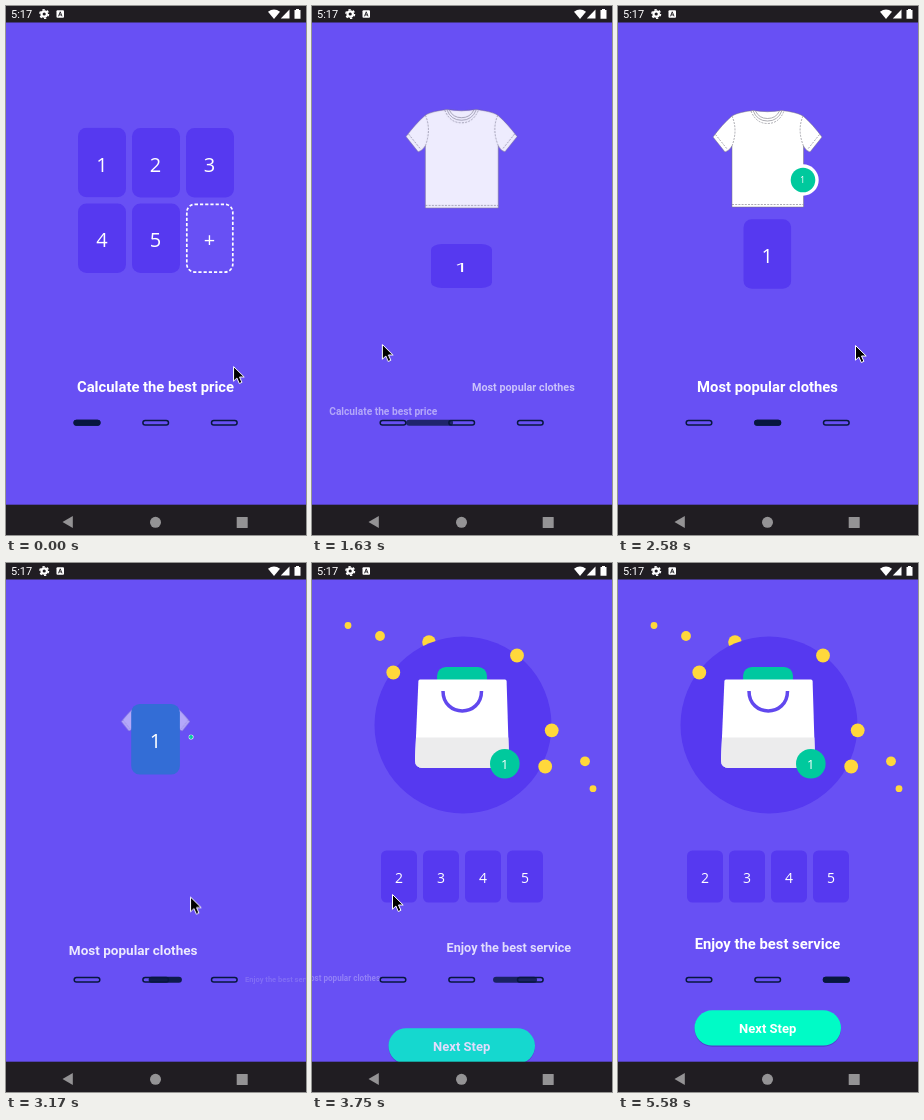
Animation, 300 px wide and 529 px high, one loop 5.62 s. Source, as an HTML page:

```html
<!DOCTYPE html>
<html lang="en">
<head>
<meta charset="utf-8">
<title>Onboarding</title>
<style>
  html, body { margin: 0; width: 100%; height: 100%; overflow: hidden; background: #6850f4; }
  svg { display: block; width: 300px; height: 529px; }
  text { fill: #fff; text-anchor: middle; font-family: "Open Sans", "Noto Sans", sans-serif; }
  .title { font: 700 14.8px Roboto, sans-serif; }
  .num { font-size: 20px; }
  .small { font-size: 14px; }
  .card { fill: #5639f0; }
  .slot { fill: none; stroke: #07173f; stroke-width: 1.5; }
  .stitch { fill: none; stroke: #8a8a92; stroke-width: .7; stroke-dasharray: 2 1.2; }
  .seam { fill: none; stroke: #8a8a92; stroke-width: .7; }

  .anim { animation: 5620ms linear infinite both; }
  .grid { transform-origin: 149.5px 194px; animation-name: grid; }
  .title1 { animation-name: title1; }
  .title2 { animation-name: title2; }
  .title3 { animation-name: title3; }
  .pill { fill: #07173f; animation-name: pill; }
  .shirt { transform-origin: 149.5px 152px; animation-name: shirt; }
  .tag { transform-origin: 185px 174px; animation-name: tag; }
  .first { animation-name: first; }
  .first rect { animation-name: tint; }
  .halo { transform-origin: 151px 162px; animation-name: halo; }
  .bag { transform-origin: 150px 205px; animation-name: bag; }
  .detail { animation-name: detail; }
  .count { transform-origin: 193px 201px; animation-name: count; }
  .rest { transform-origin: 150px 313px; animation-name: rest; }
  .button { animation-name: button; }
  .cursor { animation-name: cursor; }

  @keyframes grid {
    0%, 21.7% { transform: none; opacity: 1; }
    27.5%, 100% { transform: scale(.6); opacity: 0; }
  }
  @keyframes title1 {
    0%, 21.7% { transform: translate(0, 0) scale(1); opacity: 1; }
    29% { transform: translate(-78px, 24px) scale(.69); opacity: .5; }
    36.5%, 100% { transform: translate(-150px, 44px) scale(.4); opacity: 0; }
  }
  @keyframes title2 {
    0%, 21.7% { transform: translate(132px, 10px) scale(.42); opacity: 0; }
    29% { transform: translate(62px, .5px) scale(.73); opacity: .65; }
    36.5%, 53.4% { transform: translate(0, 0) scale(1); opacity: 1; }
    60.85% { transform: translate(-55px, 16px) scale(.79); opacity: .7; }
    66.73% { transform: translate(-120px, 34px) scale(.55); opacity: .28; }
    72.6%, 100% { transform: translate(-155px, 44px) scale(.4); opacity: 0; }
  }
  @keyframes title3 {
    0%, 53.4% { transform: translate(140px, 44px) scale(.42); opacity: 0; }
    60.85% { transform: translate(107px, 23.5px) scale(.64); opacity: .4; }
    66.73% { transform: translate(47.5px, 4px) scale(.856); opacity: .8; }
    72.6%, 100% { transform: translate(0, 0) scale(1); opacity: 1; }
  }
  @keyframes pill {
    0%, 21.7% { x: 67.5px; width: 27px; opacity: 1; }
    29% { x: 94px; width: 47px; opacity: .75; }
    36.5%, 53.4% { x: 136.2px; width: 27px; opacity: 1; }
    60.85% { x: 152px; width: 42.5px; opacity: .8; }
    66.73% { x: 181px; width: 44px; opacity: .8; }
    72.6%, 100% { x: 204.8px; width: 27px; opacity: 1; }
  }
  @keyframes shirt {
    0%, 23% { transform: translateY(0) scale(1.08); opacity: 0; }
    29% { transform: translateY(0) scale(1.02); opacity: .89; }
    33%, 53.4% { transform: translateY(0) scale(1); opacity: 1; }
    59.5%, 100% { transform: translateY(40px) scale(.25); opacity: 0; }
  }
  @keyframes tag {
    0%, 31% { transform: scale(0); }
    36.5%, 53.4% { transform: scale(1); }
    57%, 100% { transform: scale(0); }
  }
  @keyframes first {
    0%, 21.7% { transform: translate(96px, 156.5px) scale(1); }
    29% { transform: translate(149.5px, 260px) scale(1.27, .63); }
    36.5%, 53.4% { transform: translate(149.3px, 248px) scale(1); }
    60.85% { transform: translate(149.8px, 71px) scale(1.04); }
    66%, 100% { transform: translate(150px, 140px) scale(1.04); }
  }
  @keyframes tint {
    0%, 53.4% { fill: #5639f0; }
    60.85% { fill: #00b8b0; }
    66%, 100% { fill: #00c8a0; }
  }
  @keyframes halo {
    0%, 61% { transform: scale(0); animation-timing-function: ease-out; }
    65.8%, 100% { transform: scale(1); }
  }
  @keyframes bag {
    0%, 57% { transform: scale(0); }
    60.85% { transform: scale(.35); }
    65%, 100% { transform: scale(1); }
  }
  @keyframes detail {
    0%, 61% { opacity: 0; }
    65%, 100% { opacity: 1; }
  }
  @keyframes count {
    0%, 62.5% { transform: scale(0); }
    66.3%, 100% { transform: scale(1); }
  }
  @keyframes rest {
    0%, 61.2% { transform: scale(.6); opacity: 0; }
    66%, 100% { transform: scale(1); opacity: 1; }
  }
  @keyframes button {
    0%, 53.4% { transform: translateY(80px); opacity: 0; }
    60.85% { transform: translateY(47px); opacity: .5; }
    66.73% { transform: translateY(18px); opacity: .8; }
    72.6%, 100% { transform: translateY(0); opacity: 1; }
  }
  @keyframes cursor {
    0% { transform: translate(227px, 360px); }
    9%, 12.5% { transform: translate(238px, 367px); }
    18% { transform: translate(245px, 358px); }
    21% { transform: translate(240px, 350px); }
    29% { transform: translate(70px, 338px); }
    32% { transform: translate(50px, 337px); }
    35% { transform: translate(55px, 337px); }
    43% { transform: translate(224px, 338px); }
    45.9%, 51.6% { transform: translate(237px, 339px); }
    54% { transform: translate(230px, 336px); }
    60.85% { transform: translate(100px, 329px); }
    63.2% { transform: translate(80px, 331px); }
    74.9% { transform: translate(80px, 331px); opacity: 1; }
    74.91%, 100% { transform: translate(80px, 331px); opacity: 0; }
  }
</style>
</head>
<body>
<svg viewBox="0 0 300 529">
  <rect width="300" height="529" fill="#6850f4"/>

  <g class="anim grid">
    <g class="card">
      <rect x="126" y="122" width="48" height="69.5" rx="8.5"/>
      <rect x="180" y="122" width="48" height="69.5" rx="8.5"/>
      <rect x="72" y="197.5" width="48" height="69.5" rx="8.5"/>
      <rect x="126" y="197.5" width="48" height="69.5" rx="8.5"/>
    </g>
    <rect x="180.8" y="198.3" width="46" height="67.8" rx="8" fill="none" stroke="#fff" stroke-width="1.7" stroke-dasharray="3.2 2"/>
    <g class="num">
      <text x="149.5" y="165.5">2</text>
      <text x="203.5" y="165.5">3</text>
      <text x="96" y="241">4</text>
      <text x="149.5" y="241">5</text>
      <text x="203.5" y="241">+</text>
    </g>
  </g>

  <g class="anim shirt">
    <path d="M135 104.5C127 105.500 119 107 114 110C107 116 101 123 95 131L107 146Q111 145 114 140V201H185.500V140Q188 145 192 146L204 131C198 123 192 116 185 110C180 107 172 105.500 164 104.500Q149.500 107 135 104.500Z" fill="#fff" stroke="#77747f" stroke-width=".5"/>
    <path class="seam" d="M135 104.500Q139 115 149.500 115T164 104.500M137.500 105Q141 112.500 149.500 112.500T161.500 105"/>
    <path class="stitch" d="M133 105Q138 117.500 149.500 117.500T166 105M114 110Q120 124 114 140M185 110Q179 124 185.500 140M97.500 128.500L109.500 143.500M201.500 128.500L189.500 143.500M114 198.500H185.500"/>
  </g>

  <g class="anim halo">
    <circle cx="117" cy="79" r="6.8" fill="#ffd83b"/>
    <circle cx="151" cy="162" r="88.5" fill="#5639f0"/>
    <g fill="#ffd83b">
      <circle cx="36" cy="62.500" r="3.4"/>
      <circle cx="68" cy="73" r="4.9"/>
      <circle cx="81.300" cy="109.500" r="6.900"/>
      <circle cx="205" cy="92.500" r="6.900"/>
      <circle cx="239.700" cy="167.300" r="6.900"/>
      <circle cx="233.200" cy="203.500" r="6.900"/>
      <circle cx="273" cy="198.300" r="4.900"/>
      <circle cx="281" cy="225.700" r="3.400"/>
    </g>
  </g>

  <g class="anim first">
    <rect class="anim" x="-24" y="-34.700" width="48" height="69.500" rx="8.500"/>
    <text class="num" y="9">1</text>
  </g>

  <g class="anim bag">
    <path d="M108 116.500H193Q194.500 116.500 194.600 118L197 197Q197 205 189 205H111Q103 205 103 197L106.400 118Q106.500 116.500 108 116.500Z" fill="#fff"/>
    <g class="anim detail">
      <path d="M104 174.500H196.300L197 197Q197 205 189 205H111Q103 205 103 197Z" fill="#ececed"/>
      <path d="M131 128C131 154.500 169.500 154.500 169.500 128" fill="none" stroke="#6148ee" stroke-width="3.500"/>
    </g>
  </g>

  <g class="anim tag">
    <circle cx="185" cy="174" r="15.700" fill="#fff"/>
    <circle cx="185" cy="174" r="12.300" fill="#00c99d"/>
    <text x="184.700" y="177.300" font-size="9">1</text>
  </g>
  <g class="anim count">
    <circle cx="192.800" cy="200.800" r="14.800" fill="#00c99d"/>
    <text x="192.800" y="205.500" font-size="13">1</text>
  </g>

  <g class="anim rest">
    <g class="card">
      <rect x="69" y="287.500" width="36" height="52" rx="5.500"/>
      <rect x="111" y="287.500" width="36" height="52" rx="5.500"/>
      <rect x="153" y="287.500" width="36" height="52" rx="5.500"/>
      <rect x="195" y="287.500" width="36" height="52" rx="5.500"/>
    </g>
    <g class="small">
      <text x="87" y="319.500">2</text>
      <text x="129" y="319.500">3</text>
      <text x="171" y="319.500">4</text>
      <text x="213" y="319.500">5</text>
    </g>
  </g>

  <g transform="translate(149.500 381)" class="title">
    <text y="5" class="anim title title1">Calculate the best price</text>
    <text y="5" class="anim title title2">Most popular clothes</text>
    <text y="5" class="anim title title3">Enjoy the best service</text>
  </g>

  <rect class="anim pill" y="413.800" height="6" rx="3"/>
  <g class="slot">
    <rect x="68.200" y="414.500" width="25.600" height="4.600" rx="2.300"/>
    <rect x="136.900" y="414.500" width="25.600" height="4.600" rx="2.300"/>
    <rect x="205.500" y="414.500" width="25.600" height="4.600" rx="2.300"/>
  </g>

  <g class="anim button">
    <rect x="76.500" y="448.200" width="146.500" height="35.500" rx="17.700" fill="#3c2cae" opacity=".55"/>
    <rect x="76.500" y="447.300" width="146.500" height="35.300" rx="17.600" fill="#00fbc6"/>
    <text x="149.700" y="470" style="font:700 13px Roboto, sans-serif">Next Step</text>
  </g>

  <rect width="300" height="16.500" fill="#201d22"/>
  <text x="5" y="12" style="font:400 11px Roboto, sans-serif;text-anchor:start">5:17</text>
  <g fill="none" stroke="#fff">
    <circle cx="38.200" cy="8" r="2.700" stroke-width="2.200"/>
    <circle cx="38.200" cy="8" r="4.300" stroke-width="1.500" stroke-dasharray="2.250 2.250"/>
  </g>
  <rect x="50.500" y="4.300" width="7.500" height="7.500" rx="1" fill="#fff"/>
  <path d="M52.500 10.300L54.250 5.800L56 10.300M53.100 8.900H55.400" fill="none" stroke="#201d22" stroke-width=".9"/>
  <g fill="#fff">
    <path d="M262 5.700Q268 1.300 274 5.700L268 13Z"/>
    <path d="M283.500 3.500V12.500H274.800Z"/>
    <path d="M288.500 4H290V3H293V4H294.500V12.700H288.500Z"/>
  </g>

  <rect y="498.700" width="300" height="30.300" fill="#201d22"/>
  <g fill="#949395">
    <path d="M56.500 516L66.800 510V522Z"/>
    <circle cx="149.500" cy="516.300" r="5.500"/>
    <rect x="230.700" y="511" width="11" height="11" rx=".5"/>
  </g>

  <path class="anim cursor" d="M.5 .5V15.200L3.900 12L6.300 17.500L8.900 16.300L6.500 11H11.200Z" fill="#000" stroke="#fff" stroke-width="1"/>
</svg>
</body>
</html>
```
